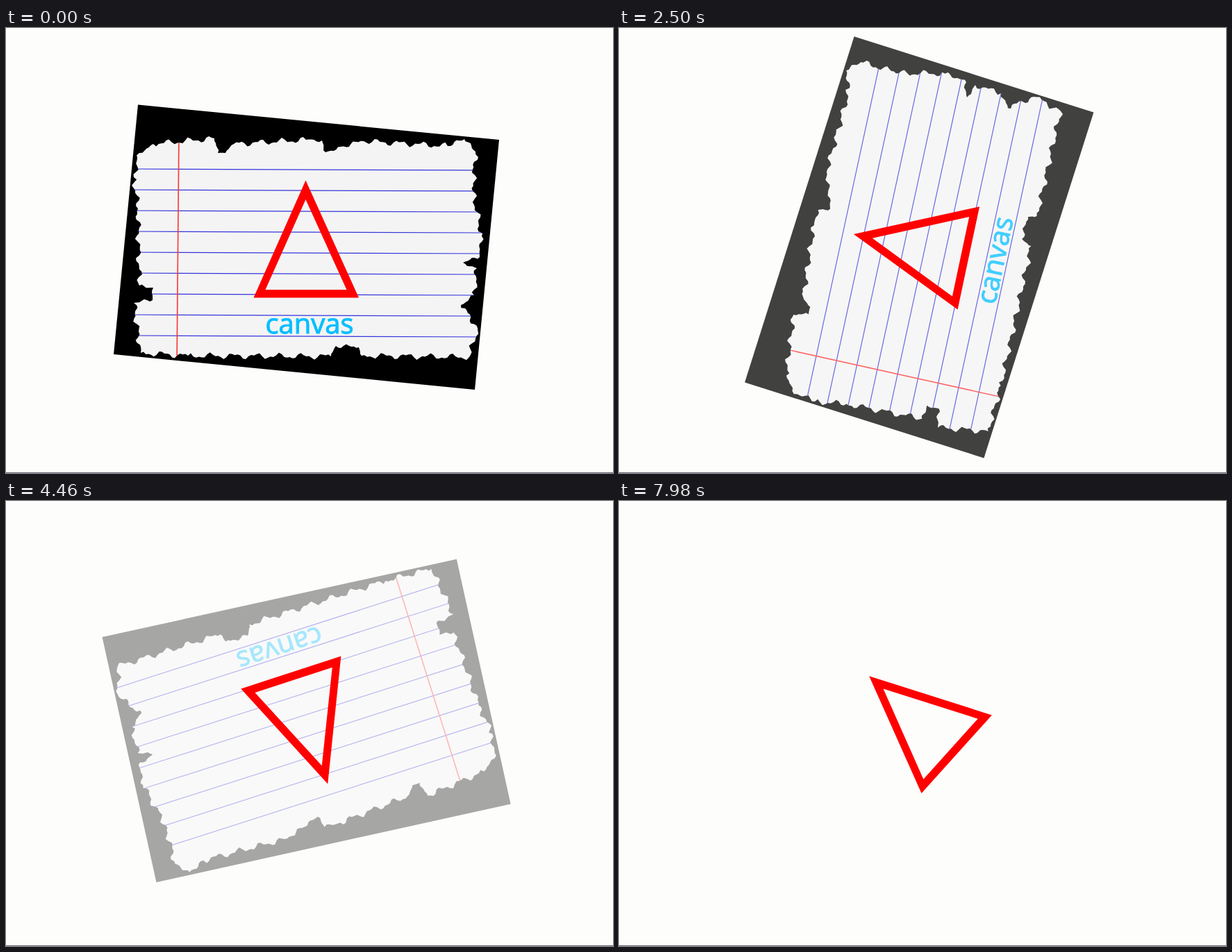
These frames come from a looping animation (874x641 px, 8 s). An HTML page:

```html
<!DOCTYPE html>
<html lang="en">
<head>
<meta charset="utf-8">
<title>Spinning canvas</title>
<style>
  html, body { margin: 0; width: 100%; height: 100%; overflow: hidden; background: #fdfdfc; }
  svg { display: block; width: 100vw; height: 100vh; }
  text { font: 40px "Open Sans", "Noto Sans", sans-serif; text-rendering: geometricPrecision; }
</style>
</head>
<body>
<svg viewBox="0 0 874 641">
  <defs><clipPath id="torn"><path id="outline"/></clipPath></defs>
  <rect y="640" width="874" height="1" fill="#667"/>
  <g id="spinner">
    <g id="canvas">
      <path d="M190 110.5 710 161 675 521 155 470Z"/>
      <g clip-path="url(#torn)">
        <rect x="150" y="130" width="560" height="370" fill="#f4f4f4"/>
        <path id="rules" stroke="#3434dc" stroke-width="1.2"/>
        <path d="M249 150 246 490" stroke="#f33" stroke-width="1.6"/>
      </g>
      <text x="437" y="440" text-anchor="middle" fill="#00bfff" stroke="#00bfff">canvas</text>
    </g>
    <path fill="#f00" fill-rule="evenodd"
      d="M431.5 219.5 508 388.5H356.5ZM431.5 247 373.5 377H490.5Z"/>
  </g>
</svg>
<script>
  const LOOP = 8000, PIVOT = '432.5 316', DEGREES_PER_TICK = 3, FADE_TICKS = 100;
  const byId = id => document.getElementById(id);
  const spinner = byId('spinner'), canvas = byId('canvas');

  // Main corners of the torn paper, clockwise from the top left
  const corners = `192,180 212,167 300,159 305,180 316,180 328,167
    432,161 455,162 460,179 482,171 515,163 636,170 660,160 676,178
    672,235 685,300 682,330 658,338 678,346 674,385 655,399 679,432 667,474
    512,472 508,460 475,458 468,473 262,472 194,468
    184,396 211,392 212,374 192,371 190,260 184,215`
    .split(/\s+/).map(p => p.split(',').map(Number));

  // Each edge gets small ragged bites between its corners
  const ragged = corners.flatMap(([x, y], i) => {
    const [nx, ny] = corners[(i + 1) % corners.length];
    const length = Math.hypot(nx - x, ny - y), parts = Math.ceil(length / 4);
    const depth = Math.min(3.2, length / 14);
    return Array.from({ length: parts }, (_, j) => {
      const f = j / parts, s = j * 4;
      const bite = j ? depth * (Math.sin(i * 7 + s * 0.19) + 0.6 * Math.sin(i + s * 0.43)) : 0;
      return [x + (nx - x) * f - (ny - y) / length * bite,
              y + (ny - y) * f + (nx - x) / length * bite].map(v => v.toFixed(1));
    });
  });
  byId('outline').setAttribute('d', 'M' + ragged.join(' ') + 'Z');
  byId('rules').setAttribute('d',
    Array.from({ length: 9 }, (_, i) => `M180 ${203 + 30 * i}L690 ${205 + 30 * i}`).join(''));

  // The picture advances in groups of three, held for 100, 20 and 20 ms
  function stepAt(time) {
    if (time < 20) return 0;
    const t = time - 20, rest = t % 140;
    return 1 + 3 * Math.floor(t / 140) + (rest < 100 ? 0 : rest < 120 ? 1 : 2);
  }

  // [step, ticks turned]
  const pace = [[0, 0], [27, 0], [31, 4], [34, 6], [53, 26], [116, 86], [172, 137]];
  function ticksAt(step) {
    const i = Math.max(1, pace.findIndex(([s]) => s >= step));
    const [s0, k0] = pace[i - 1], [s1, k1] = pace[i];
    return Math.round(k0 + (k1 - k0) * (step - s0) / (s1 - s0));
  }

  function draw(now) {
    const ticks = ticksAt(stepAt(now % LOOP));
    spinner.setAttribute('transform', `rotate(${-DEGREES_PER_TICK * ticks} ${PIVOT})`);
    canvas.setAttribute('opacity', Math.max(0, 1 - ticks / FADE_TICKS));
    requestAnimationFrame(draw);
  }
  draw(performance.now());
</script>
</body>
</html>
```
